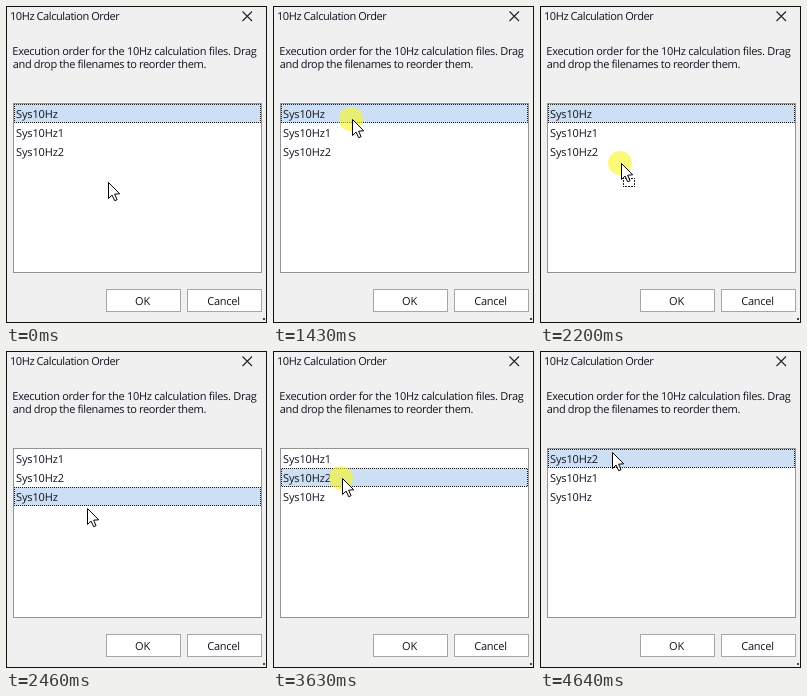
These frames come from a looping animation (261 by 317 pixels, 5.83 s). An HTML page with a canvas:

```html
<!DOCTYPE html>
<html lang="en">
<head>
<meta charset="utf-8">
<title>Calculation order</title>
<style>
  html, body { margin: 0; width: 100%; height: 100%; overflow: hidden; background: #f0f0f0; }
  canvas { display: block; width: 261px; height: 317px; }
</style>
</head>
<body>
<canvas id="stage" width="261" height="317"></canvas>
<script>
const ctx = document.getElementById('stage').getContext('2d');
const LOOP = 5830, STEP = 70;
const ROW_X = 8, ROW_Y = 98, ROW_W = 247, ROW_H = 19;

// Pointer moves: first step time, step count, end point, ease-out power per axis
const START = { x: 101, y: 176 };
const MOVES = [
  { at: 280,  steps: 8, x: 78, y: 108,   ex: 2.1, ey: 1.2 },
  { at: 900,  steps: 1, x: 78, y: 107,   ex: 1,   ey: 1 },
  { at: 1430, steps: 9, x: 80, y: 142.4, ex: 1,   ey: 1.5 },
  { at: 2060, steps: 3, x: 80, y: 157,   ex: 1,   ey: 1 },
  { at: 2530, steps: 1, x: 80, y: 156,   ex: 1,   ey: 1 },
  { at: 3000, steps: 7, x: 68, y: 127,   ex: 2.5, ey: 2.5 },
  { at: 3960, steps: 6, x: 71, y: 101,   ex: 1,   ey: 1.1 }
];

const LISTS = [
  { at: 0,    names: ['Sys10Hz', 'Sys10Hz1', 'Sys10Hz2'], selected: 0 },
  { at: 2460, names: ['Sys10Hz1', 'Sys10Hz2', 'Sys10Hz'], selected: 2 },
  { at: 3630, names: ['Sys10Hz1', 'Sys10Hz2', 'Sys10Hz'], selected: 1 },
  { at: 4640, names: ['Sys10Hz2', 'Sys10Hz1', 'Sys10Hz'], selected: 0 }
];

const PRESSES = [
  { down: 1170, drag: 1500, up: 2460 },
  { down: 3630, drag: 4030, up: 4640 }
];

const easeOut = (p, power) => 1 - Math.pow(1 - p, power);

function pointerAt(t) {
  let { x, y } = START;
  for (const m of MOVES) {
    if (t < m.at) break;
    const p = Math.min(1, (Math.floor((t - m.at) / STEP) + 1) / m.steps);
    x += (m.x - x) * easeOut(p, m.ex);
    y += (m.y - y) * easeOut(p, m.ey);
  }
  return { x: Math.round(x), y: Math.round(y) };
}

function box(x, y, w, h, fill, line) {
  ctx.fillStyle = fill;
  ctx.fillRect(x, y, w, h);
  ctx.strokeStyle = line;
  ctx.lineWidth = 1;
  ctx.strokeRect(x + 0.5, y + 0.5, w - 1, h - 1);
}

// Dots keep to one checkerboard, so their phase follows the corner
function dottedBox(x, y, w, h, dash) {
  ctx.setLineDash(dash);
  ctx.lineDashOffset = (x + y) % 2;
  ctx.strokeStyle = '#1c1c1c';
  ctx.lineWidth = 1;
  ctx.beginPath();
  for (const dy of [0.5, h - 0.5]) {
    ctx.moveTo(x, y + dy);
    ctx.lineTo(x + w, y + dy);
  }
  for (const dx of [0.5, w - 0.5]) {
    ctx.moveTo(x + dx, y);
    ctx.lineTo(x + dx, y + h);
  }
  ctx.stroke();
  ctx.setLineDash([]);
}

function label(text, x, y, tracking, align = 'left') {
  ctx.font = '11px "Open Sans", "Noto Sans", sans-serif';
  ctx.textRendering = 'geometricPrecision';
  ctx.letterSpacing = tracking + 'px';
  ctx.textAlign = align;
  ctx.fillStyle = '#12121f';
  ctx.fillText(text, x, y);
}

function button(text, x) {
  box(x, 283, 75, 23, '#fff', '#a6a6a6');
  label(text, x + 36.5, 299, -0.25, 'center');
}

function drawDialog() {
  box(0, 0, 261, 317, '#f0f0f0', '#111');
  label('10Hz Calculation Order', 4, 14, -0.42);
  label('Execution order for the 10Hz calculation files. Drag', 6.3, 49, -0.28);
  label('and drop the filenames to reorder them.', 6.8, 62, -0.36);

  ctx.strokeStyle = '#222';
  ctx.lineWidth = 1.1;
  ctx.beginPath();
  ctx.moveTo(236.5, 5.5);
  ctx.lineTo(246, 15);
  ctx.moveTo(246, 5.5);
  ctx.lineTo(236.5, 15);
  ctx.stroke();

  button('OK', 100);
  button('Cancel', 181);

  ctx.fillStyle = '#444';
  ctx.fillRect(257, 312, 2, 2);
}

function drawList({ names, selected }) {
  box(7, 97, 249, 170, '#fff', '#949494');
  const top = ROW_Y + selected * ROW_H;
  ctx.fillStyle = '#cddff5';
  ctx.fillRect(ROW_X, top, ROW_W, ROW_H);
  dottedBox(ROW_X, top, ROW_W, ROW_H, [1, 1]);
  names.forEach((name, i) => label(name, 10, 112 + i * ROW_H, -0.13));
}

function drawHalo({ x, y }) {
  ctx.fillStyle = 'rgba(250, 246, 30, 0.6)';
  ctx.beginPath();
  ctx.arc(x, y, 12, 0, Math.PI * 2);
  ctx.fill();
}

function drawPointer({ x, y }, dragging) {
  if (dragging) {
    ctx.fillStyle = '#fff';
    ctx.fillRect(x + 3, y + 15, 12, 9);
    dottedBox(x + 3, y + 15, 12, 9, [2, 1]);
  }
  const arrow = [[0, 0], [0, 16], [3.6, 12.6], [6.2, 18.2], [8.6, 17.2], [6.1, 11.7], [11.2, 11.3]];
  ctx.beginPath();
  for (const [dx, dy] of arrow) ctx.lineTo(x + dx + 1.5, y + dy + 0.5);
  ctx.closePath();
  ctx.fillStyle = '#fff';
  ctx.fill();
  ctx.strokeStyle = '#000';
  ctx.lineWidth = 1;
  ctx.stroke();
}

function draw(t) {
  const pointer = pointerAt(t);
  const press = PRESSES.find(p => t >= p.down && t < p.up);
  drawDialog();
  drawList(LISTS.findLast(list => t >= list.at));
  if (press) drawHalo(pointer);
  drawPointer(pointer, press && t >= press.drag);
}

const begin = performance.now();
function frame() {
  draw((performance.now() - begin) % LOOP);
  requestAnimationFrame(frame);
}
frame();
</script>
</body>
</html>
```
